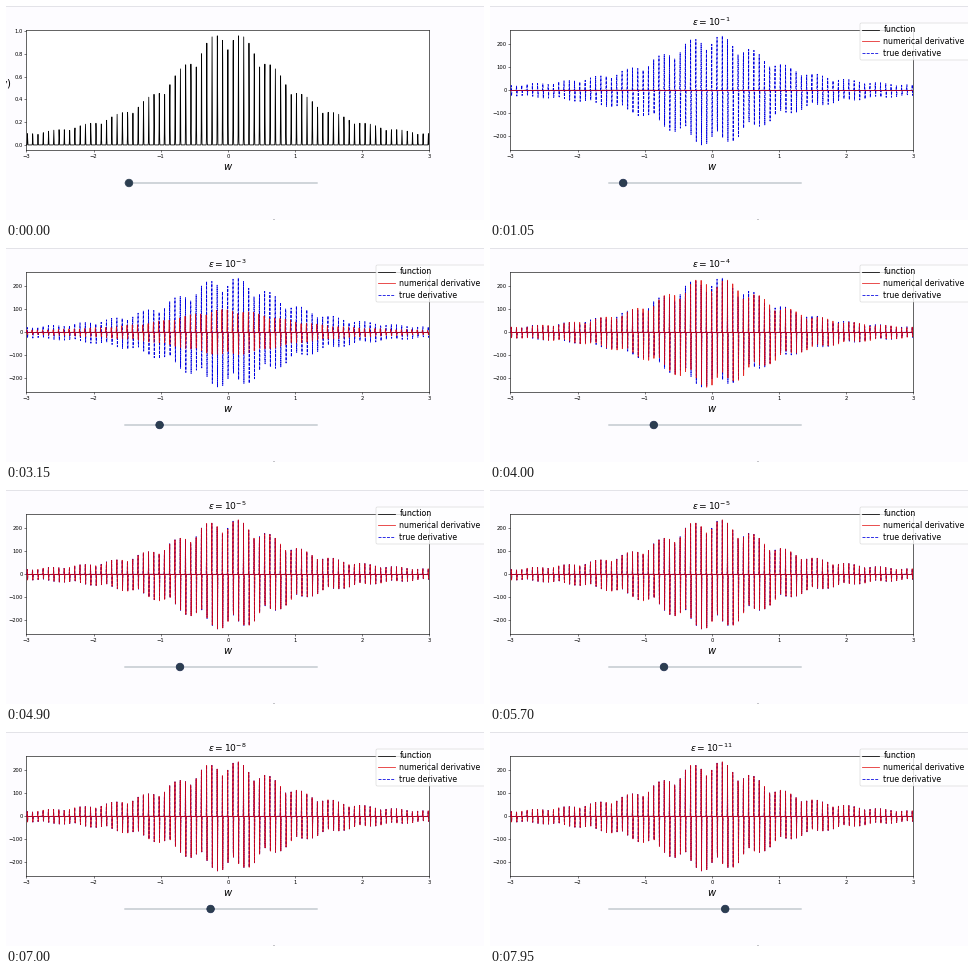
A matplotlib script that plays this animation: 478 px wide and 214 px high, repeating every 8000 ms.

```python
import numpy as np
import matplotlib.pyplot as plt
from matplotlib.animation import FuncAnimation
from matplotlib.patches import Circle, FancyBboxPatch, Rectangle

W, H, DPI = 478, 214, 100
FRAMES, INTERVAL = 160, 50
PX = 72 / DPI  # points per pixel

BACK = "#fdfcff"
RED = "#e00000"
TRACK = "#d0d5da"
HANDLE = "#2c3e50"

# Frame at which the slider reaches each position; position 0 is the function.
STEP_STARTS = [0, 20, 39, 59, 76, 96, 116, 127, 135, 142, 147, 152]
PRESS = 10


def f(x):
    return np.cos(40 * x) ** 100 / (1 + x**2)


def slope(x):
    c, s, q = np.cos(40 * x), np.sin(40 * x), 1 + x**2
    return -4000 * c**99 * s / q - 2 * x * c**100 / q**2


def padded(y):
    pad = 0.05 * (y.max() - y.min())
    return y.min() - pad, y.max() + pad


w = np.linspace(-3, 3, 2000)
values, slopes = f(w), slope(w)

plt.rcParams["font.family"] = "DejaVu Sans"
plt.rcParams["mathtext.fontset"] = "dejavusans"
fig = plt.figure(figsize=(W / 100, H / 100), dpi=DPI, facecolor=BACK)

# Plot area
left, right, top, bottom = 20.4, 423.4, 24.4, 144.4
ax = fig.add_axes([left / W, 1 - bottom / H, (right - left) / W, (bottom - top) / H])
ax.set_xlim(-3, 3)
ax.set_xticks(range(-3, 4))
ax.tick_params(labelsize=5.2 * PX, length=1.8 * PX, width=0.5 * PX, pad=1.8 * PX)
for spine in ax.spines.values():
    spine.set_linewidth(0.6 * PX)

LW = 0.8 * PX
STYLES = {
    "function": dict(color="black", lw=LW, zorder=2),
    "numerical derivative": dict(color=RED, lw=LW, alpha=0.85, zorder=4),
    "true derivative": dict(color="#0000e0", lw=LW, ls="--", zorder=3),
}
curve, = ax.plot(w, values, **STYLES["function"])
numeric, = ax.plot(w, 0 * w, **STYLES["numerical derivative"])
exact, = ax.plot(w, slopes, **STYLES["true derivative"])

# Overlay in pixel coordinates, y pointing down
page = fig.add_axes([0, 0, 1, 1], zorder=5)
page.set_xlim(0, W)
page.set_ylim(H, 0)
page.axis("off")


def label(x, y, text, size, **kw):
    return page.text(x, y, text, fontsize=size * PX, **kw)


page.add_patch(Rectangle((0, 0), W, 1.3, color="#e3e3e8", lw=0))
page.add_patch(Rectangle((267.5, 212.6), 2, 1.4, color="#c4c4c8", lw=0))
label(221.7, 163.8, "$w$", 10, ha="center")
ylabel = label(5.2, 80.5, "$f(w)$", 10, ha="right")
title = label(221.8, 20.3, "", 9.2, ha="center")

# Legend, running off the right edge
legend = [page.add_patch(FancyBboxPatch(
    (370, 17), 120, 37, boxstyle="round,pad=0,rounding_size=1.5",
    fc=(1, 1, 1, 0.8), ec=(0.8, 0.8, 0.8, 0.8), lw=0.6 * PX))]
for row, (name, style) in enumerate(STYLES.items()):
    y = 23.6 + 11.7 * row
    legend += page.plot([372.5, 389], [y, y], **style)
    legend.append(label(393.3, y + 2.7, name, 7.9, zorder=5))

# Slider
page.plot([119, 311], [177, 177], color=TRACK, lw=2 * PX, solid_capstyle="round")
handle = page.add_patch(Circle((123, 177), 3.8, fc=HANDLE, lw=0.7 * PX, zorder=6))


def update(n):
    k = sum(n >= start for start in STEP_STARTS) - 1
    derivative = k > 0

    handle.center = (123 + 10.2 * k, 177)
    handle.set_edgecolor("#1c2a4c" if n >= PRESS else HANDLE)

    for item in [numeric, exact, title, *legend]:
        item.set_visible(derivative)
    ylabel.set_visible(not derivative)

    if derivative:
        eps = 10.0 ** (1 - k)
        numeric.set_ydata((f(w + eps) - values) / eps)
        title.set_text(rf"$\epsilon = 10^{{-{k}}}$")
        ax.set_yticks(range(-200, 201, 100))
        ax.set_ylim(padded(slopes))
    else:
        ax.set_yticks(np.arange(6) / 5)
        ax.set_ylim(padded(values))
    return []


anim = FuncAnimation(fig, update, frames=FRAMES, interval=INTERVAL,
                     init_func=lambda: update(0), repeat=True, repeat_delay=0)
plt.show()
```
